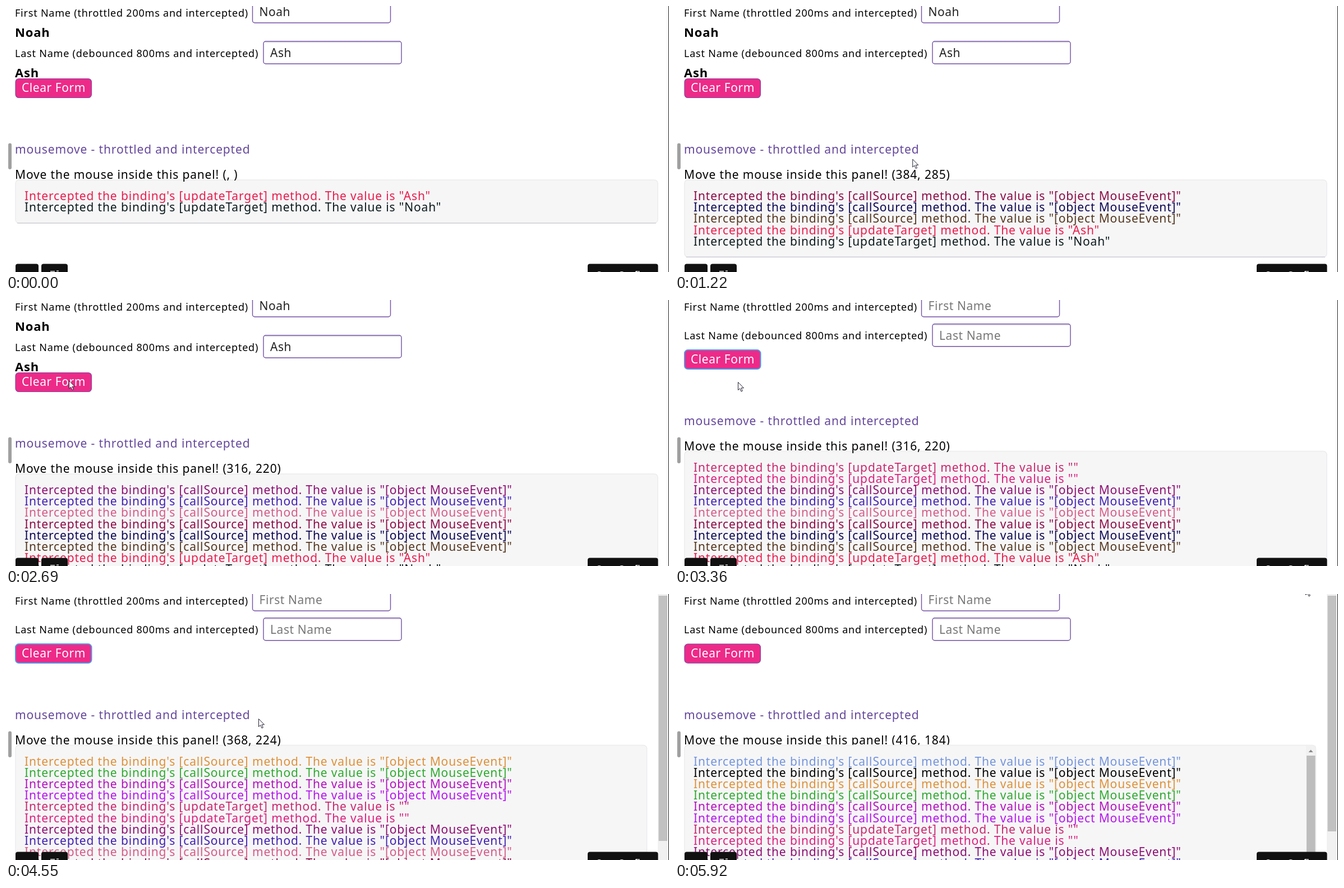
Animation, 1182 px wide and 474 px high, one loop 5990 ms. Source, as an HTML page:

```html
<!DOCTYPE html>
<html lang="en">
<head>
<meta charset="utf-8">
<title>Throttled and intercepted bindings</title>
<style>
  html, body { margin: 0; width: 100%; height: 100%; overflow: hidden; background: #fff; }
  svg { display: block; font: 21px "Noto Sans", "Open Sans", sans-serif; letter-spacing: .85px; }
  .label { font-size: 18px; letter-spacing: .78px; }
  .field { letter-spacing: .55px; }
  .bold { font-weight: 600; font-size: 22px; }
  .dark { font-weight: 600; font-size: 15px; letter-spacing: 0; }
</style>
</head>
<body>
<svg id="stage" width="1182" height="474"></svg>
<script>
const LOOP = 5990, STEP = 70, ROW = 20.2;
const FIRST = 'Noah', LAST = 'Ash';
const CLEAR_FIRST = 2690, CLEAR_LAST = 2760, BLUR = 5250;

const callMsg = ['callSource', '[object MouseEvent]'];
const setMsg = value => ['updateTarget', value];

// time, colour, message, shown mouse position
const events = [
  [0, '#0c1a1c', setMsg(FIRST), ', '],
  [0, '#ea1c4c', setMsg(LAST), ', '],
  [630, '#54361f', callMsg, '278, 257'],
  [910, '#0b0652', callMsg, '252, 290'],
  [1190, '#8b0a45', callMsg, '384, 285'],
  [1330, '#d45a85', callMsg, '374, 262'],
  [1610, '#4020b0', callMsg, '316, 220'],
  [1890, '#8c0d72', callMsg, '316, 220'],
  [CLEAR_FIRST, '#dc1f7d', setMsg(''), '316, 220'],
  [CLEAR_LAST, '#c9276d', setMsg(''), '316, 220'],
  [3990, '#b413ee', callMsg, '228, 236'],
  [4060, '#b30fbf', callMsg, '252, 248'],
  [4340, '#2da92d', callMsg, '332, 246'],
  [4550, '#dd9038', callMsg, '368, 224'],
  [4760, '#000', callMsg, '400, 205'],
  [4970, '#7394dc', callMsg, '416, 184']
];

// time, x, y of the pointer tip
const path = [
  [140, 520, -10], [420, 410, 130], [700, 330, 245], [910, 304, 278], [1220, 436, 272],
  [1360, 426, 250], [1640, 368, 208], [1780, 374, 172], [1990, 413, 146],
  [2340, 240, 132], [2620, 112, 140], [2690, 112, 146], [3360, 112, 146],
  [3920, 275, 197], [4130, 289, 261], [4340, 384, 252], [4550, 450, 222],
  [4970, 468, 172], [5180, 590, 37], [5460, 1110, 2], [5530, 1124, -30],
  [5910, 1124, -30], [5920, 1124, -13], [5990, 1124, -13]
];

const stage = document.getElementById('stage');

const text = (x, y, str, fill = '#000', cls = '') =>
  `<text x="${x}" y="${y}" fill="${fill}" class="${cls}">${str}</text>`;
const rect = (x, y, w, h, fill, r = 0, stroke = 'none', sw = 1) =>
  `<rect x="${x}" y="${y}" width="${w}" height="${h}" rx="${r}" fill="${fill}" stroke="${stroke}" stroke-width="${sw}"/>`;

function input(x, y, value, hint) {
  return rect(x, y, 246, 40, '#fff', 4, '#7150a5', 1.4) +
    rect(x + 2, y + 1.2, 242, 1.5, '#e4e2e8') +
    text(x + 12, y + 28, value || hint, value ? '#222' : '#777', 'field');
}

function pointer(t) {
  const i = path.findIndex(p => p[0] > t);
  if (i < 1) return '';
  const [t0, x0, y0] = path[i - 1], [t1, x1, y1] = path[i];
  const k = (t - t0) / (t1 - t0);
  const x = x0 + (x1 - x0) * k, y = y0 + (y1 - y0) * k;
  if (t >= 4060 && t <= 4200)
    return `<path transform="translate(${x} ${y})" d="M-3 0h2.5l.5 1 .5-1H3M0 1V15M-3 16h2.5l.5-1 .5 1H3" fill="none" stroke="#222"/>`;
  return `<path transform="translate(${x} ${y})" d="M.5 .5V14.5L3.7 11.6 6 17 8.3 16 6 10.8H10.5Z" fill="#fff" stroke="#223"/>`;
}

function panel(y, width, height) {
  return rect(17, y, width, height, '#f6f6f7', 6, '#ececee', 1.5) +
    rect(20, y + height - .5, width - 6, 1.2, '#c9c9ce');
}

function draw(t) {
  const log = events.filter(e => e[0] <= t);
  const n = log.length;
  const up1 = t >= CLEAR_FIRST ? ROW : 0;
  const up = up1 + (t >= CLEAR_LAST ? ROW : 0);
  const focus = t >= CLEAR_FIRST && t < BLUR;
  const pageBar = n > 10, panelBar = n > 15;
  const top = 310 - up;

  let s = text(16, 18.5, 'First Name (throttled 200ms and intercepted)', '#000', 'label') +
    input(439.5, -10, up1 ? '' : FIRST, 'First Name') +
    text(16, 90.5 - up1, 'Last Name (debounced 800ms and intercepted)', '#000', 'label') +
    input(459, 63 - up1, up > ROW ? '' : LAST, 'Last Name');
  if (!up1) s += text(16, 55, FIRST, '#000', 'bold');
  if (up <= ROW) s += text(16, 127 - up1, LAST, '#000', 'bold');

  s += rect(17, 129.5 - up, 135.5, 34, '#ee2a88', 6, focus ? '#4d9be6' : '#8048a0', focus ? 2 : 1.2) +
    text(28, 153 - up, 'Clear Form', '#fff', 'field') +
    text(16, 263 - up, 'mousemove - throttled and intercepted', '#64479c');

  const move = text(16, 308 - up, `Move the mouse inside this panel! (${log[n - 1][3]})`);
  const box = panel(top, pageBar ? 1125.5 : 1145, 36.3 + ROW * n);
  s += panelBar ? move + box : box + move;

  log.reverse().forEach(([, colour, [method, value]], i) => {
    s += text(33, 346 - up + ROW * i,
      `Intercepted the binding's [${method}] method. The value is "${value}"`, colour);
  });

  if (panelBar) {
    s += rect(1125, top + 1, 17.5, 300, '#f1f1f1') + rect(1126, 288, 15.5, 200, '#bdbdbd') +
      '<path d="M1129.5 282l4-4.5 4 4.5z" fill="#888"/>';
  }
  if (pageBar) {
    s += rect(1162, 0, 18.5, 474, '#f1f1f1') +
      rect(1163.5, 3, 15.5, 675 - 17 * Math.min(n, 15), '#c1c1c1');
  }

  s += rect(4, 244.5, 6, 46.5, '#a0a0a0', 3) + rect(1181, 0, 1, 474, '#222');
  for (const [x, w] of [[17, 41], [63, 47], [1037, 125.5]])
    s += rect(x, 459.5, w, 30, '#111', 4);
  s += rect(79, 472, 8, 1.5, '#ddd') + rect(90, 471.5, 4, 1.5, '#ddd') +
    text(1053, 483, 'Save Config', '#eee', 'dark') + pointer(t);
  stage.innerHTML = s;
}

let shown = -1;
function tick() {
  const t = performance.now() % LOOP;
  const step = Math.floor(t / STEP);
  // the pointer peeks back in just before the loop ends
  const at = t >= 5920 ? 5920 : Math.min(step * STEP, 5880);
  if (at !== shown) draw(shown = at);
  requestAnimationFrame(tick);
}
tick();
</script>
</body>
</html>
```
